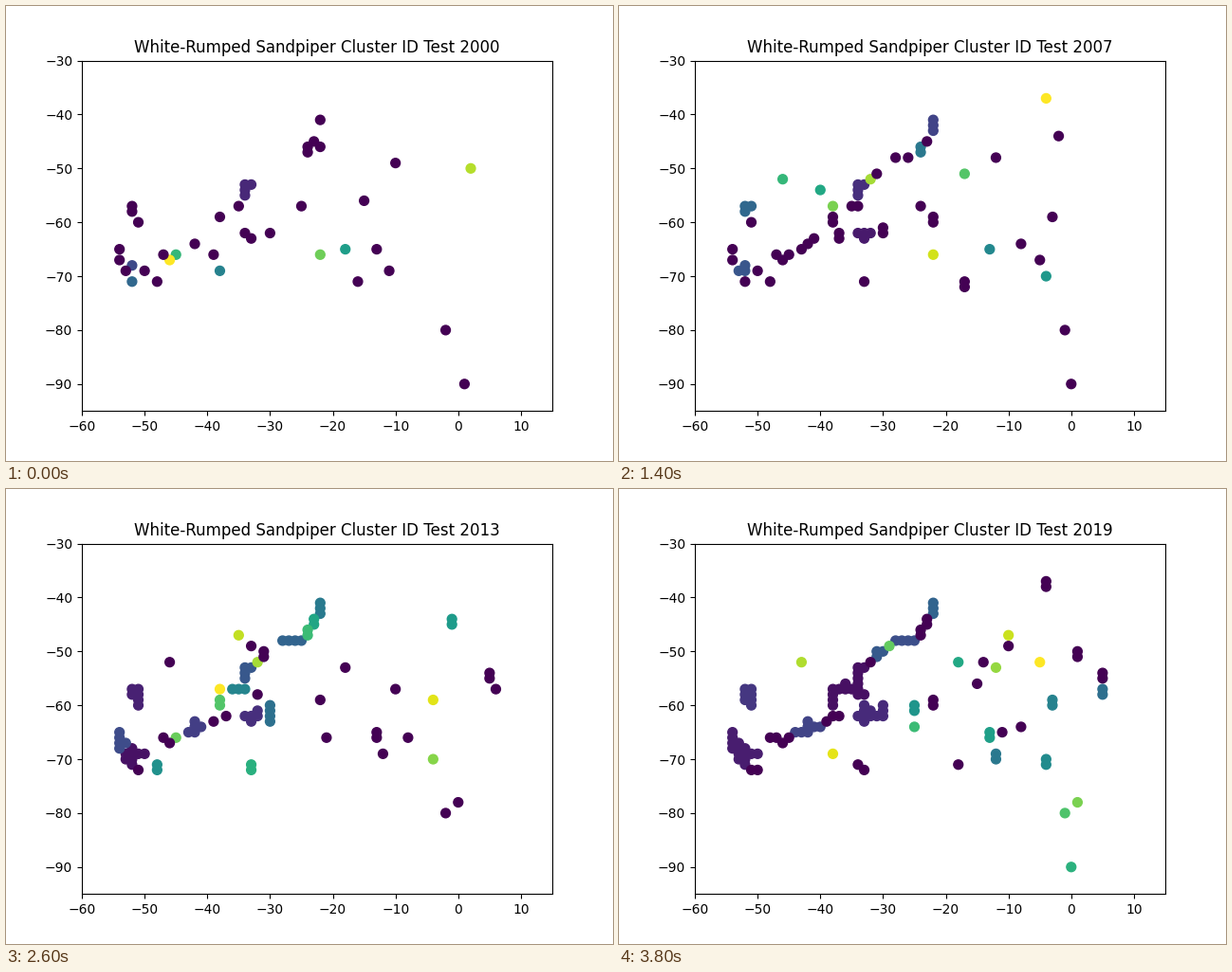
These frames come from a looping animation (640x480 px, 4 s). A matplotlib script:

```python
import random

import matplotlib.pyplot as plt
import numpy as np
from matplotlib.animation import FuncAnimation

FIRST, YEARS = 2000, 20

# Shorelines as (share seen in the first year, corner points)
ROUTES = [
    (0.45, [(-54, -65), (-54, -68), (-53, -67), (-53, -70), (-52, -68),
            (-52, -71), (-51, -69), (-50, -69)]),
    (0.10, [(-51, -72), (-50, -72)]),
    (0.40, [(-52, -57), (-52, -59), (-51, -60), (-51, -57)]),
    (0.45, [(-38, -60), (-38, -57), (-36, -57), (-36, -56), (-34, -58),
            (-34, -53), (-33, -53), (-32, -52)]),
    (0.05, [(-31, -51), (-31, -50), (-30, -50), (-28, -48), (-25, -48),
            (-24, -46), (-22, -43), (-22, -41)]),
    (0.10, [(-48, -66), (-46, -67), (-44, -65), (-42, -65), (-42, -63),
            (-40, -64), (-38, -62), (-37, -62)]),
    (0.10, [(-34, -62), (-30, -62), (-30, -60), (-31, -62), (-33, -60),
            (-33, -63)]),
]
# Isolated resting places, visited now and then
STOPS = [(-25, -57), (-22, -59), (-16, -56), (-24, -65), (-22, -66),
         (-13, -65), (-12, -69), (-17, -71), (-33, -71), (-38, -69),
         (-48, -71), (-24, -60), (-9, -64), (-3, -59), (-3, -70), (-2, -44),
         (-4, -37), (-9, -49), (2, -50), (5, -54), (6, -57), (0, -78),
         (-2, -80), (0, -90)]


def walk(corners):
    """Grid cells passed on the way from corner to corner."""
    cells = [corners[0]]
    for a, b in zip(corners, corners[1:]):
        steps = max(abs(b[0] - a[0]), abs(b[1] - a[1]))
        for t in np.arange(1, steps + 1) / steps:
            cells.append((round(a[0] + t * (b[0] - a[0])),
                          round(a[1] + t * (b[1] - a[1]))))
    return list(dict.fromkeys(cells))


base = random.Random(FIRST)
COAST = [(cell, start, base.random())
         for start, corners in ROUTES for cell in walk(corners)]


def sightings(growth, rng):
    """Shores fill up over the years; stops and strays vary freely."""
    cells = [cell for cell, start, rank in COAST
             if rank + rng.uniform(-0.15, 0.05) < start + (1 - start) * growth]
    for x, y in STOPS:
        if rng.random() < 0.35 + 0.5 * growth:
            x += rng.choice((-1, 0, 0, 0, 1))
            cells.append((x, y))
            if rng.random() < 0.5 * growth:
                cells.append((x, y - 1))
    for _ in range(round(4 + 8 * growth)):
        cells.append((rng.randint(-46, -5), rng.randint(-72, -46)))
    return list(dict.fromkeys(cells))


def components(cells):
    """Groups of cells that touch along a side."""
    left, found = dict.fromkeys(cells), []
    while left:
        group = [left.popitem()[0]]
        for x, y in group:
            for cell in ((x + 1, y), (x - 1, y), (x, y + 1), (x, y - 1)):
                if cell in left:
                    del left[cell]
                    group.append(cell)
        found.append(group)
    return found


def season(i):
    """Points of one year and their colour values; noise lies on top."""
    growth = i / (YEARS - 1)
    rng = random.Random(FIRST + i)
    clusters, noise = [], []
    for group in components(sightings(growth, rng)):
        if len(group) > 2 or rng.random() < 0.1 + 0.4 * growth:
            clusters.append(group)
        else:
            noise += group
    rng.shuffle(clusters)
    clusters.sort(key=len, reverse=True)
    points = [p for group in clusters for p in group] + noise
    values = [(k + 1) / len(clusters)
              for k, group in enumerate(clusters) for _ in group]
    return points, values + [0] * len(noise)


fig, ax = plt.subplots(figsize=(6.4, 4.8), dpi=100)
ax.set_xlim(-60, 15)
ax.set_ylim(-95, -30)
dots = ax.scatter([0], [0], c=[0], s=50, cmap="viridis", vmin=0, vmax=1)


def update(i):
    points, values = season(i)
    dots.set_offsets(points)
    dots.set_array(values)
    ax.set_title(f"White-Rumped Sandpiper Cluster ID Test {FIRST + i}")
    return [dots]


anim = FuncAnimation(fig, update, frames=YEARS, interval=200,
                     repeat=True, repeat_delay=0)
plt.show()
```
